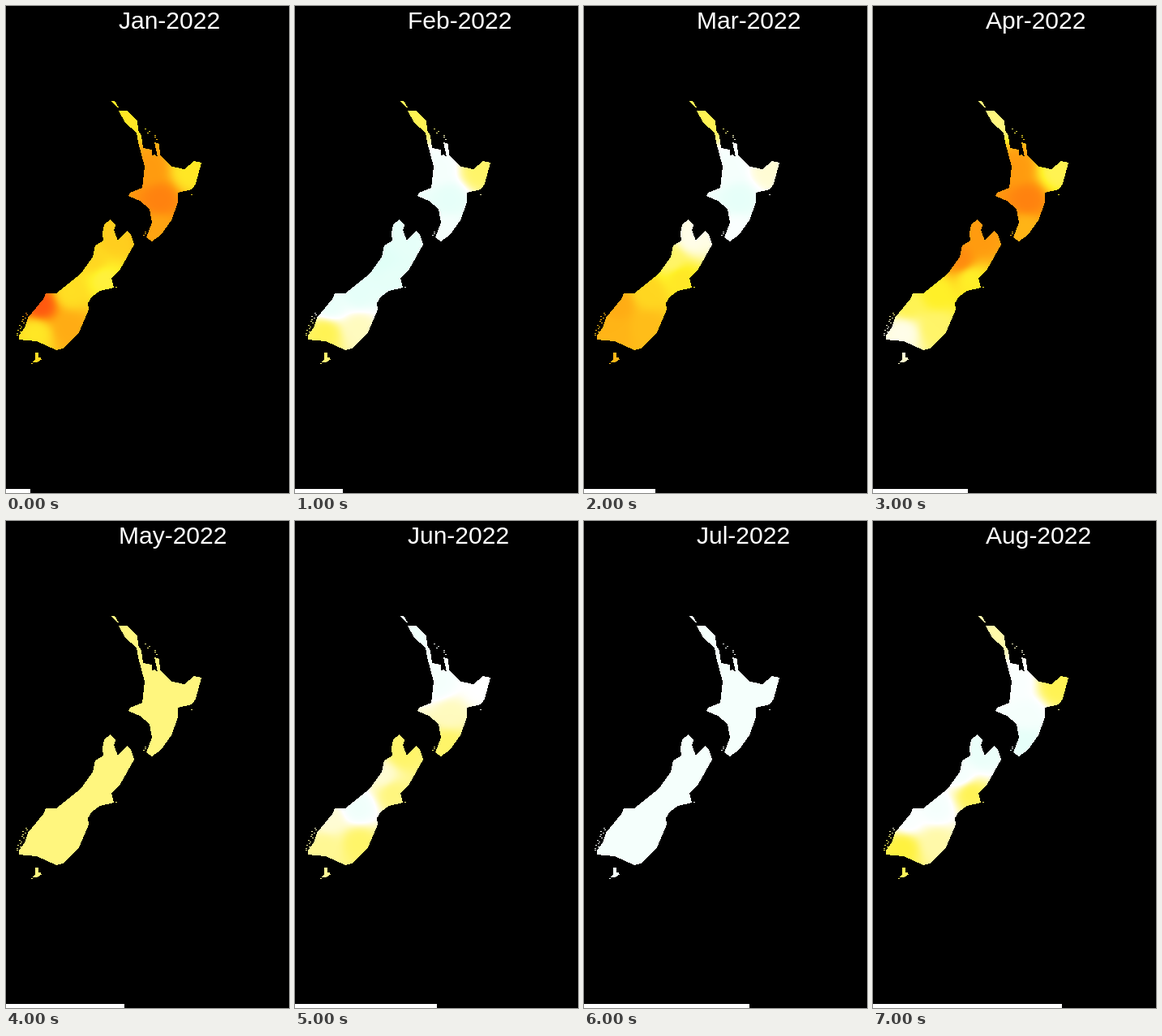
An HTML page with a canvas for the animation above (8000 ms loop, 349 by 600 pixels).

```html
<!DOCTYPE html>
<html lang="en">
<head>
<meta charset="utf-8">
<style>
  html, body { margin: 0; width: 100%; height: 100%; overflow: hidden; background: #000; }
  canvas { display: block; }
</style>
</head>
<body>
<canvas id="stage" width="349" height="600"></canvas>
<script>
const W = 349, H = 600;
const ctx = document.getElementById('stage').getContext('2d');

const north = `M139 129 150 129 162 141 163 153 167 160 169 175 180 177 180 184 184 183 187 186
  183 168 189 170 190 184 205 198 220 201 232 191 241 193 234 219 229 226 212 230 212 242 204 264
  191 282 180 290 173 285 180 267 177 250 165 240 151 234 153 230 168 224 171 198 163 168 161 156 147 144Z`;
const south = `M129 263 121 269 119 280 120 289 110 295 107 309 92 330 62 354 49 354 46 361 27 384
  23 396 16 406 16 411 38 413 62 424 70 422 90 402 102 374 101 366 106 358 116 351 133 347 130 335
  141 324 158 294 154 281 149 277 138 289 133 276 135 270Z`;
const stewart = 'M36 427h4v6h3v3l-5 3h-5l3-4z';
const cape = 'M130 117h4l6 10z';

// Stations: Northland, Waikato, East Cape, centre, Wairarapa, Nelson,
// Buller, Canterbury, Westland, Fiordland, Southland, Otago
const stations = [
  [150, 140], [176, 200], [226, 204], [190, 238], [188, 274], [132, 286],
  [108, 313], [120, 335], [78, 353], [42, 368], [36, 402], [78, 396]
];
// Level at each station; a single value holds everywhere
const months = {
  Jan: [2.1, 3, 2.1, 3.3, 2.9, 2.4, 2.3, 1.9, 2.2, 3.8, 2.1, 2.8],
  Feb: [1.8, .8, 1.7, .5, .8, .5, .4, .5, .5, .6, 1.8, 1.3],
  Mar: [1.8, .8, 1.2, .5, .9, 1.1, 1.7, 2.1, 2.3, 2.8, 2.7, 2.6],
  Apr: [1.6, 3, 1.8, 3.3, 2.7, 3, 3.2, 2, 2, 1.8, 1.1, 1.7],
  May: [1.6],
  Jun: [.7, .8, 1, 1.3, 1.7, 1.7, 1.2, 1.6, .7, 1.2, 1.5, 1.7],
  Jul: [.8],
  Aug: [1.4, .9, 1.8, .8, .5, .6, .8, 1.8, .8, .9, 1.9, 1.4]
};
const names = Object.keys(months);

// Wet to dry
const ramp = [[205, 255, 242], [255, 255, 255], [255, 240, 40], [255, 155, 15], [255, 70, 15]];

function colorAt(level) {
  const i = Math.min(Math.floor(level), ramp.length - 2);
  return ramp[i].map((c, k) => c + (ramp[i + 1][k] - c) * (level - i));
}

// Inverse distance weighting between the stations
function levelAt(x, y, values) {
  let sum = 0, total = 0;
  stations.forEach(([sx, sy], i) => {
    const weight = 1 / ((x - sx) ** 2 + (y - sy) ** 2 + 80) ** 2;
    sum += weight * (values[i] ?? values[0]);
    total += weight;
  });
  return sum / total;
}

// Dots scattered along a line
function islets(count, x1, y1, x2, y2, spread) {
  for (let i = 0; i < count; i++) {
    const t = i / (count - 1), shift = Math.sin(i * 2.4) * spread;
    ctx.fillRect(Math.round(x1 + (x2 - x1) * t + shift), Math.round(y1 + (y2 - y1) * t), 2, 1);
  }
}

function drawLand() {
  ctx.fillStyle = '#fff';
  for (const shape of [north, south, stewart, cape]) ctx.fill(new Path2D(shape));
  islets(6, 171, 151, 187, 164, 3);
  islets(14, 24, 378, 13, 405, 2);
  islets(3, 31, 440, 42, 435, 0);
  islets(3, 169, 282, 172, 278, 1);
  islets(2, 228, 232, 135, 346, 0);
  return ctx.getImageData(0, 0, W, H).data;
}

function paintMap(land, values) {
  const image = new ImageData(W, H);
  for (let p = 0; p < W * H; p++) {
    const color = land[p * 4 + 3] > 127 ? colorAt(levelAt(p % W, Math.floor(p / W), values)) : [0, 0, 0];
    image.data.set([...color, 255], p * 4);
  }
  return image;
}

const land = drawLand();
const maps = names.map(name => paintMap(land, months[name]));

function draw() {
  const month = Math.floor(performance.now() / 1000) % names.length;
  ctx.putImageData(maps[month], 0, 0);
  ctx.fillStyle = '#fff';
  ctx.font = '30px "Liberation Sans", Arial, sans-serif';
  ctx.fillText(names[month] + '-2022', 139, 28);
  ctx.fillRect(0, 595, Math.ceil(W * (month + 1) / 12), 5);
  requestAnimationFrame(draw);
}
draw();
</script>
</body>
</html>
```
